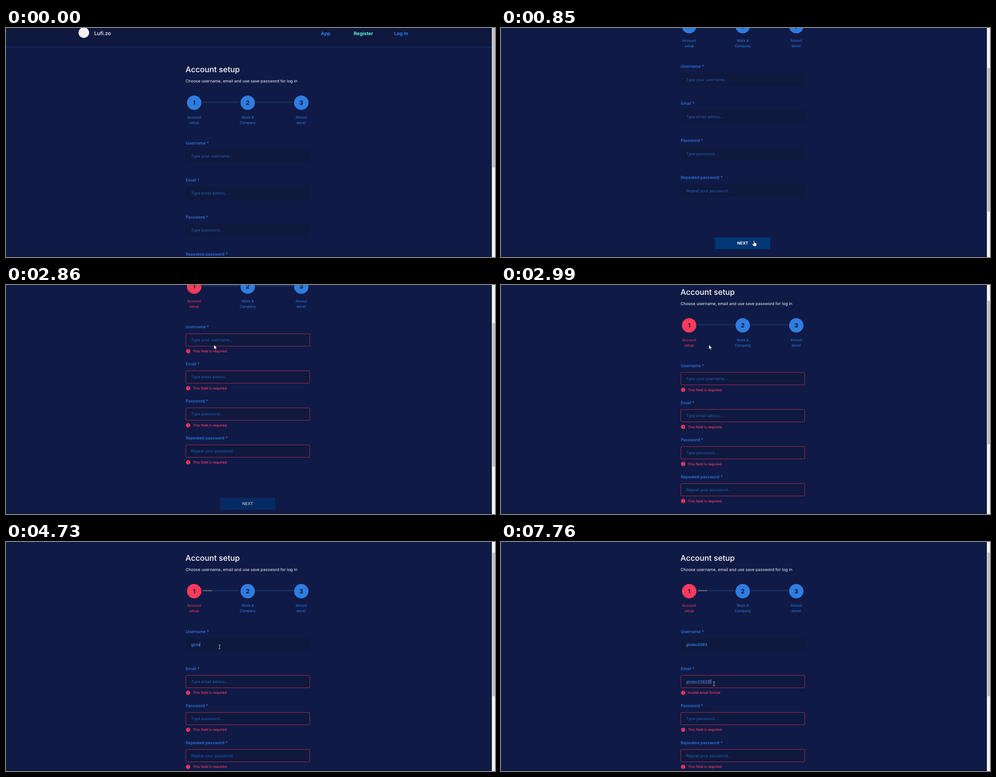
An HTML page for the animation above (8000 ms loop, 1091 by 513 pixels).

```html
<!DOCTYPE html>
<html lang="en">
<head>
<meta charset="utf-8">
<title>Account setup</title>
<style>
  html, body { margin: 0; width: 100%; height: 100%; overflow: hidden; background: #101a46; }
  svg { display: block; width: 1091px; height: 513px; font: 400 8.8px Inter, "Open Sans", sans-serif; text-rendering: geometricPrecision; }
  text { white-space: pre; fill: #2d7eea; }
  .brand { font-size: 11.5px; font-weight: 500; fill: #fff; }
  .nav { font-size: 10.6px; font-weight: 700; }
  .nav.on { fill: #64f5d5; }
  .title { font-size: 17.4px; font-weight: 500; fill: #fff; }
  .intro { font-size: 9.05px; fill: #f2f4fa; }
  .num { font-size: 13px; font-weight: 700; fill: #0a1230; text-anchor: middle; }
  .step { font-size: 8px; text-anchor: middle; }
  .label { font-size: 9.1px; font-weight: 500; }
  .hint { fill: #2460bd; }
  .value { font-weight: 500; fill: #3b8bf5; }
  .error text { font-size: 7.75px; font-weight: 500; fill: #ff3a5e; }
  .error .mark { font-weight: 700; font-size: 7.5px; fill: #101a46; text-anchor: middle; }
  .next { font-size: 9px; font-weight: 700; fill: #fff; text-anchor: middle; }
</style>
</head>
<body>
<svg id="stage" viewBox="0 0 1091 513"></svg>
<script>
const LOOP = 8000;
const FIELD_TOP = 273, FIELD_GAP = 83, FIELD_HEIGHT = 27.7;
const REQUIRED = "This field is required";
const USER = "givlan2083";
const KEYS = [4140, 4340, 4440, 4600, 4730, 4880, 5080, 5170, 5250, 5560];
const CLICK = 880, USER_FOCUS = 3620, USER_VALID = 4440, EMAIL_FOCUS = 5590, PASTE = 7230, AT_KEY = 7760;
const BLUE = [47, 125, 224], RED = [255, 58, 94];

// Each stop is [time, ...values]; values ease between stops.
const SCROLL = [[30, 0], [350, 171.5], [2825, 171.5], [3051, 57.2]];
const POINTER = [
  [300, 930, 525], [420, 904, 427], [640, 572, 433], [850, 564.5, 477],
  [1080, 564.5, 477], [1580, 464, 134], [3060, 464, 134], [3600, 476.5, 235],
  [6360, 476.5, 235], [7140, 475, 313], [7200, 475, 313], [7370, 475, 317.5]
];
const HOVER = [[760, 0], [850, 1], [1120, 1], [1270, 0]];

const ramp = (t, from, to) => {
  const k = Math.min(1, Math.max(0, (t - from) / (to - from)));
  return k * k * (3 - 2 * k);
};
const track = (stops, t) => {
  const next = stops.findIndex(s => s[0] > t);
  if (next === 0) return stops[0].slice(1);
  if (next < 0) return stops.at(-1).slice(1);
  const a = stops[next - 1], b = stops[next], k = ramp(t, a[0], b[0]);
  return a.slice(1).map((v, i) => v + (b[i + 1] - v) * k);
};

const text = (cls, x, y, content, id = "") => `<text class="${cls}" id="${id}" x="${x}" y="${y}">${content}</text>`;
const rect = (x, y, w, h, fill, extra = "") => `<rect x="${x}" y="${y}" width="${w}" height="${h}" fill="${fill}" ${extra}/>`;

const step = (lines, i) => {
  const x = 419.8 + i * 119.5;
  return `<circle id="dot${i}" cx="${x}" cy="167.4" r="16.1" fill="rgb(${BLUE})"/>` +
    text("num", x, 172.1, i + 1) +
    `<g id="caption${i}">${lines.map((line, n) => text("step", x, 202.6 + n * 12, line)).join("")}</g>` +
    (i < 2 ? rect(x + 19, 164.8, 82.5, 2.6, "#1a315f") : "");
};

const field = ([label, hint], i) => `<g transform="translate(0 ${i * FIELD_GAP})">
  ${text("label", 401, 260.8, label + " *")}
  ${rect(401, FIELD_TOP - .3, 277, FIELD_HEIGHT + .6, "#0f183d", 'rx="3"')}
  ${text("hint", 412.8, 290, hint, "hint" + i)}
  ${text("value", 412.8, 290, "", "value" + i)}
  <g class="error" id="error${i}">
    ${rect(401.2, FIELD_TOP, 276.5, FIELD_HEIGHT, "none", 'rx="2.5" stroke="#f43a5f" stroke-width=".7"')}
    <circle cx="406.4" cy="312" r="4.7" fill="#ff3a5e"/>
    ${text("mark", 406.4, 314.7, "!")}
    ${text("", 417, 314.7, REQUIRED, "message" + i)}
  </g>
</g>`;

const $ = id => document.getElementById(id);
$("stage").innerHTML = `
<g id="page">
  ${rect(0, -20, 1091, 62, "#0f183f")}
  ${rect(0, 42, 1091, 1, "#1d3f80")}
  <circle cx="173.6" cy="10.5" r="11.8" fill="#f4f1ee"/>
  ${text("brand", 196.8, 15.6, "Lufi.zo")}
  ${text("nav", 702.5, 15.8, "App")}
  ${text("nav on", 775.8, 15.8, "Register")}
  ${text("nav", 865.8, 15.8, "Log In")}
  ${text("title", 400.6, 98.8, "Account setup")}
  ${text("intro", 400.8, 122.4, "Choose username, email and use save password for log in")}
  ${[["Account", "setup"], ["Work &amp;", "Company"], ["Almost", "done!"]].map(step).join("")}
  ${rect(438.8, 164.8, 21, 2.6, "#5b6375", 'id="progress"')}
  ${[["Username", "Type your username..."], ["Email", "Type email adress..."],
     ["Password", "Type password..."], ["Repeated password", "Repeat your password..."]].map(field).join("")}
  <path id="spelling" stroke="#e0354f" stroke-width="1" stroke-dasharray="1.2 .7"/>
  ${rect(0, 0, .9, 11, "#4a97ff", 'id="caret"')}
  <g id="button">${rect(477.5, 640.5, 123.5, 26.5, "#003776", 'rx="2"')}${text("next", 539.2, 656.3, "NEXT")}</g>
</g>
${rect(0, 510.5, 1084, 2.5, "#0d163b")}
${rect(1084, 0, 7, 513, "#f1f1f1")}
${rect(1085, 0, 6, 321.5, "#c1c1c1", 'id="thumb"')}
<g id="pointer">
  <path id="arrow" d="M0 0V9.8L2.3 7.7L3.9 11.3L5.5 10.6L3.9 7.1H6.9Z" fill="#fff" stroke="#111" stroke-width=".6"/>
  <path id="hand" d="M-1 0Q0 -1 1 0V4L5 5Q6 5.4 5.8 7L5 11.8H-.8L-4 7.6Q-4 6 -2.6 6.4L-1 7.6Z" fill="#fff" stroke="#111" stroke-width=".6"/>
  <path id="beam" d="M-2.3 -4.3H-.5L0 -3.8L.5 -4.3H2.3M0 -3.8V3.8M-2.3 4.3H-.5L0 3.8L.5 4.3H2.3" fill="none" stroke="#d5d8e0" stroke-width=".9"/>
</g>`;

const set = (id, name, value) => $(id).setAttribute(name, value);
const show = (id, on) => set(id, "visibility", on ? "visible" : "hidden");

function drawPointer(t, scroll) {
  const [x, y] = track(POINTER, t), pageY = y + scroll;
  // The shape is not refreshed while the page scrolls under a resting pointer.
  const scrolling = track(SCROLL, t - 30)[0] !== scroll;
  const inField = !scrolling && x > 401 && x < 678 && pageY > FIELD_TOP && pageY < 640 &&
    (pageY - FIELD_TOP) % FIELD_GAP < FIELD_HEIGHT;
  const inButton = x > 478 && x < 601 && pageY > 640.5 && pageY < 667;
  const shape = inButton ? "hand" : inField ? "beam" : "arrow";
  set("pointer", "transform", `translate(${x} ${y})`);
  for (const id of ["arrow", "hand", "beam"]) show(id, t >= 300 && id === shape);
}

function drawInputs(t) {
  const values = [
    USER.slice(0, KEYS.filter(k => k <= t).length),
    t < PASTE ? "" : t < AT_KEY ? USER : USER + "@"
  ];
  values.forEach((value, i) => {
    $("value" + i).textContent = value;
    show("hint" + i, !value);
  });
  $("message0").textContent = values[0] ? "Username should have at least 3 characters" : REQUIRED;
  $("message1").textContent = values[1] ? "Invalid email format" : REQUIRED;

  const failed = ramp(t, CLICK - 20, CLICK + 180);
  for (let i = 0; i < 4; i++) set("error" + i, "opacity", i === 0 && t >= USER_VALID ? 0 : failed);
  const color = `rgb(${BLUE.map((c, i) => c + (RED[i] - c) * failed)})`;
  set("dot0", "fill", color);
  for (const line of $("caption0").children) line.style.fill = color;
  show("progress", t >= USER_VALID);

  const active = t < EMAIL_FOCUS ? 0 : 1;
  const lastInput = Math.max(...[USER_FOCUS, ...KEYS, EMAIL_FOCUS, PASTE, AT_KEY].filter(k => k <= t));
  const width = values[active] ? $("value" + active).getComputedTextLength() : 0;
  set("caret", "x", 412.4 + width);
  set("caret", "y", 281 + active * FIELD_GAP);
  show("caret", t >= USER_FOCUS && Math.floor((t - lastInput) / 530) % 2 === 0);
  set("spelling", "d", values[1] ? `M413 374.6h${width}` : "");
}

function draw(now) {
  const t = now % LOOP;
  const [scroll] = track(SCROLL, t), [hover] = track(HOVER, t);
  set("page", "transform", `translate(0 ${-scroll})`);
  set("thumb", "y", -9 + scroll * .576);
  set("button", "opacity", .6 + .4 * hover);
  drawInputs(t);
  drawPointer(t, scroll);
}

const start = performance.now();
function tick() {
  draw(performance.now() - start);
  requestAnimationFrame(tick);
}
tick();
</script>
</body>
</html>
```
